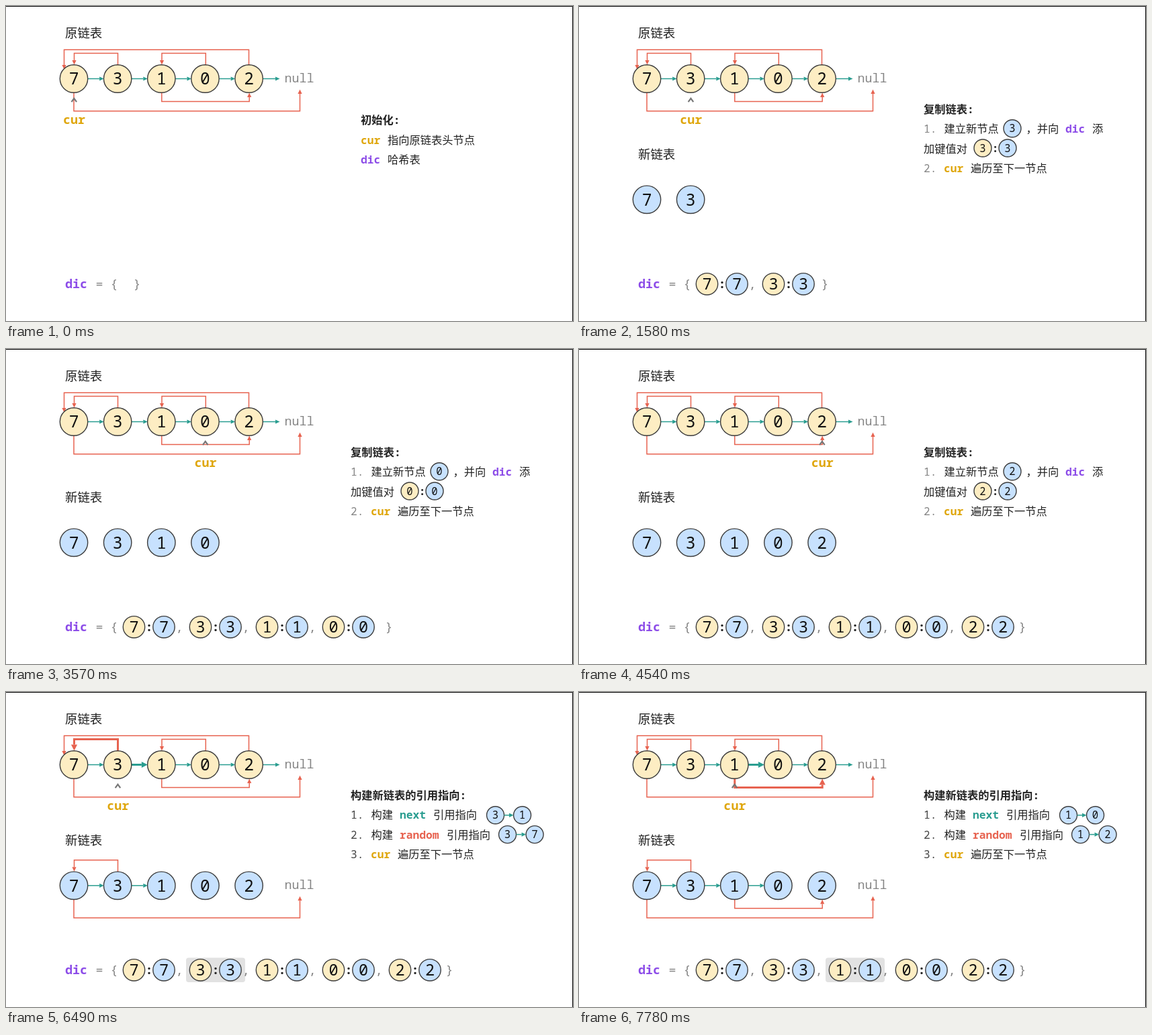
Animation, 844 px wide and 470 px high, one loop 8 s. Source, as an HTML page:

```html
<!DOCTYPE html>
<html lang="zh-CN">
<head>
<meta charset="utf-8">
<title>复制链表</title>
<style>
html, body { margin: 0; width: 100%; height: 100%; overflow: hidden; background: #fff; }
svg { display: block; width: 844px; height: 470px; }
text { font-family: "Noto Sans Mono", "Noto Sans CJK SC", "Noto Sans CJK", monospace; white-space: pre; }
</style>
</head>
<body>
<svg id="stage" viewBox="0 0 844 470"></svg>
<script>
const LOOP = 8000;
const STEP_STARTS = [0, 570, 1540, 2550, 3570, 4540, 5550, 6490, 7580];
const VALUES = [7, 3, 1, 0, 2];
const BRACE_X = [195, 267, 366, 466, 570, 660];
const RANDOM_TARGETS = ['null', 7, 2];
const COLOR = {
  ink: '#222', gray: '#858585', red: '#e76350', teal: '#2a9d90',
  purple: '#8c4ce8', gold: '#dfa60c', yellow: '#fdedc3', blue: '#c7e1fe'
};
const BIG = 18.4, BODY = 16.25;
const LIST_Y = 108.5, COPY_Y = 288.8;
const nodeX = i => 101 + 65.15 * i;

function text(x, y, str, fill = COLOR.ink, size = BODY, bold = false, anchor = 'start') {
  return `<text x="${x}" y="${y}" fill="${fill}" font-size="${size}" font-weight="${bold ? 700 : 400}" text-anchor="${anchor}">${str}</text>`;
}

function disc(x, y, r, value, fill, size) {
  return `<circle cx="${x}" cy="${y}" r="${r}" fill="${fill}" stroke="#3c3c3c" stroke-width="1.4"/>` +
    text(x, y + size * 0.357, value, '#111', size, false, 'middle');
}
const smallDisc = (x, y, value, fill = COLOR.blue) => disc(x, y, 13, value, fill, 15.5);

// Polyline through points, ending in a filled head at the last one.
function arrow(points, color, bold = false) {
  const [tx, ty] = points.at(-1), [px, py] = points.at(-2);
  const dx = Math.sign(tx - px), dy = Math.sign(ty - py);
  const len = bold ? 9 : 6.5, half = bold ? 4.6 : 3.1;
  const bx = tx - dx * len, by = ty - dy * len;
  const line = [...points.slice(0, -1), [bx, by]].join(' ');
  const head = [[tx, ty], [bx - dy * half, by + dx * half], [bx + dy * half, by - dx * half]].join(' ');
  return `<polyline points="${line}" fill="none" stroke="${color}" stroke-width="${bold ? 3 : 1.5}"/>` +
    `<polygon points="${head}" fill="${color}"/>`;
}

function nextArrow(i, y, bold) {
  const end = i === 4 ? 407.5 : nodeX(i + 1) - 20.5;
  return arrow([[nodeX(i) + 20.7, y], [end, y]], COLOR.teal, bold);
}

// Each random link leaves a node, runs along a lane and enters its target.
function randomArrow(i, y, bold) {
  const [from, lane, to, end] = [
    [101, 48.3, 437.5, 16], [166.5, -38, 101.5, -21], [231.8, 34, 362.2, 21],
    [297.3, -38, 232, -21], [361.5, -43.3, 86.5, -14]
  ][i];
  const start = Math.sign(lane) * 20.7;
  return arrow([[from, y + start], [from, y + lane], [to, y + lane], [to, y + end]], COLOR.red, bold);
}

const range = n => [...Array(n).keys()];
const nullLabel = y => text(414.5, y + 5.5, 'null', COLOR.gray, BIG);

function cursor(i) {
  const x = nodeX(i) + 0.3;
  return `<path d="M${x - 3.8} 143.2L${x} 137.8L${x + 3.8} 143.2" fill="none" stroke="#777" stroke-width="2.2"/>` +
    text(x + 0.3, 176, 'cur', COLOR.gold, BIG, true, 'middle');
}

function originalList(active) {
  return text(88, 47.2, '原链表', COLOR.ink, BIG) +
    range(5).map(i => nextArrow(i, LIST_Y, i === active)).join('') +
    range(5).map(i => randomArrow(i, LIST_Y, i === active)).join('') +
    VALUES.map((v, i) => disc(nodeX(i), LIST_Y, 20.7, v, COLOR.yellow, 24.5)).join('') +
    nullLabel(LIST_Y);
}

function copiedList(count, links) {
  if (!count) return '';
  return text(88, 227.6, '新链表', COLOR.ink, BIG) +
    range(links).map(i => nextArrow(i, COPY_Y) + randomArrow(i, COPY_Y)).join('') +
    VALUES.slice(0, count).map((v, i) => disc(nodeX(i), COPY_Y, 20.7, v, COLOR.blue, 24.5)).join('') +
    (links ? nullLabel(COPY_Y) : '');
}

function dictionary(count, active) {
  const pairs = VALUES.slice(0, count).map((v, i) => {
    const x = 190.5 + 99 * i;
    return (i === active ? `<rect x="${x - 21.5}" y="396.5" width="88" height="36.5" rx="4" fill="#e2e2e2"/>` : '') +
      disc(x, 414.8, 16.2, v, COLOR.yellow, 23.5) +
      text(x + 22.5, 421, ':', COLOR.ink, BIG, true, 'middle') +
      disc(x + 44.5, 414.8, 16.2, v, COLOR.blue, 23.5) +
      (i < count - 1 || active >= 0 && i < 4 ? text(x + 67.5, 421, ',', COLOR.gray, BIG, false, 'middle') : '');
  });
  return text(88, 421, 'dic', COLOR.purple, BIG, true) +
    text(139, 421, '=', COLOR.gray, BIG, false, 'middle') +
    text(161, 421, '{', COLOR.gray, BIG, false, 'middle') + pairs.join('') +
    text(BRACE_X[count], 421, '}', COLOR.gray, BIG, false, 'middle');
}

function introNotes() {
  return text(528, 176, '初始化:', COLOR.ink, BODY, true) +
    text(528, 205.5, 'cur', COLOR.gold, BODY, true) + text(568, 205.5, '指向原链表头节点') +
    text(528, 234.5, 'dic', COLOR.purple, BODY, true) + text(568, 234.5, '哈希表');
}

const advanceNote = (number, color) => text(513, 248.2, number, color) +
  text(543, 248.2, 'cur', COLOR.gold, BODY, true) + text(583, 248.2, '遍历至下一节点');

function copyNotes(value) {
  return text(513, 160, '复制链表:', COLOR.ink, BODY, true) +
    text(513, 189.3, '1.', COLOR.gray) + text(543.5, 189.3, '建立新节点') +
    smallDisc(645, 182.8, value) + text(665.5, 189.3, '，并向') +
    text(724, 189.3, 'dic', COLOR.purple, BODY, true) + text(764, 189.3, '添') +
    text(513, 218.6, '加键值对') + smallDisc(601, 212, value, COLOR.yellow) +
    text(619.5, 218, ':', COLOR.ink, BODY, true, 'middle') + smallDisc(638, 212, value) +
    advanceNote('2.', COLOR.gray);
}

function linkNotes(i) {
  const target = RANDOM_TARGETS[i];
  return text(513, 160, '构建新链表的引用指向:', COLOR.ink, BODY, true) +
    text(513, 189.3, '1.', '#444') + text(543.5, 189.3, '构建') +
    text(586, 189.3, 'next', COLOR.teal, BODY, true) + text(636, 189.3, '引用指向') +
    smallDisc(728.5, 183.8, VALUES[i]) + arrow([[741.5, 183.8], [755.5, 183.8]], COLOR.teal) +
    smallDisc(768.5, 183.8, VALUES[i + 1]) +
    text(513, 218.6, '2.', '#444') + text(543.5, 218.6, '构建') +
    text(586, 218.6, 'random', COLOR.red, BODY, true) + text(656, 218.6, '引用指向') +
    smallDisc(746.5, 212.6, VALUES[i]) + arrow([[759.5, 212.6], [774, 212.6]], COLOR.teal) +
    (target === 'null' ? text(776, 217, 'null', COLOR.gray, 14.2) : smallDisc(787, 212.6, target)) +
    advanceNote('3.', '#444');
}

function draw(step) {
  const linking = step > 5;
  const active = linking ? step - 6 : -1;
  const count = Math.min(step, 5);
  const current = linking ? active : Math.max(step - 1, 0);
  const notes = linking ? linkNotes(active) : step ? copyNotes(VALUES[current]) : introNotes();
  return '<path d="M0 .5H843.5V470" fill="none" stroke="#000"/>' +
    originalList(active) + cursor(current) +
    copiedList(count, active + 1) + dictionary(count, active) + notes;
}

const stage = document.getElementById('stage');
let shown = -1;
function tick() {
  const time = performance.now() % LOOP;
  const step = STEP_STARTS.filter(start => start <= time).length - 1;
  if (step !== shown) stage.innerHTML = draw(shown = step);
  requestAnimationFrame(tick);
}
tick();
</script>
</body>
</html>
```
